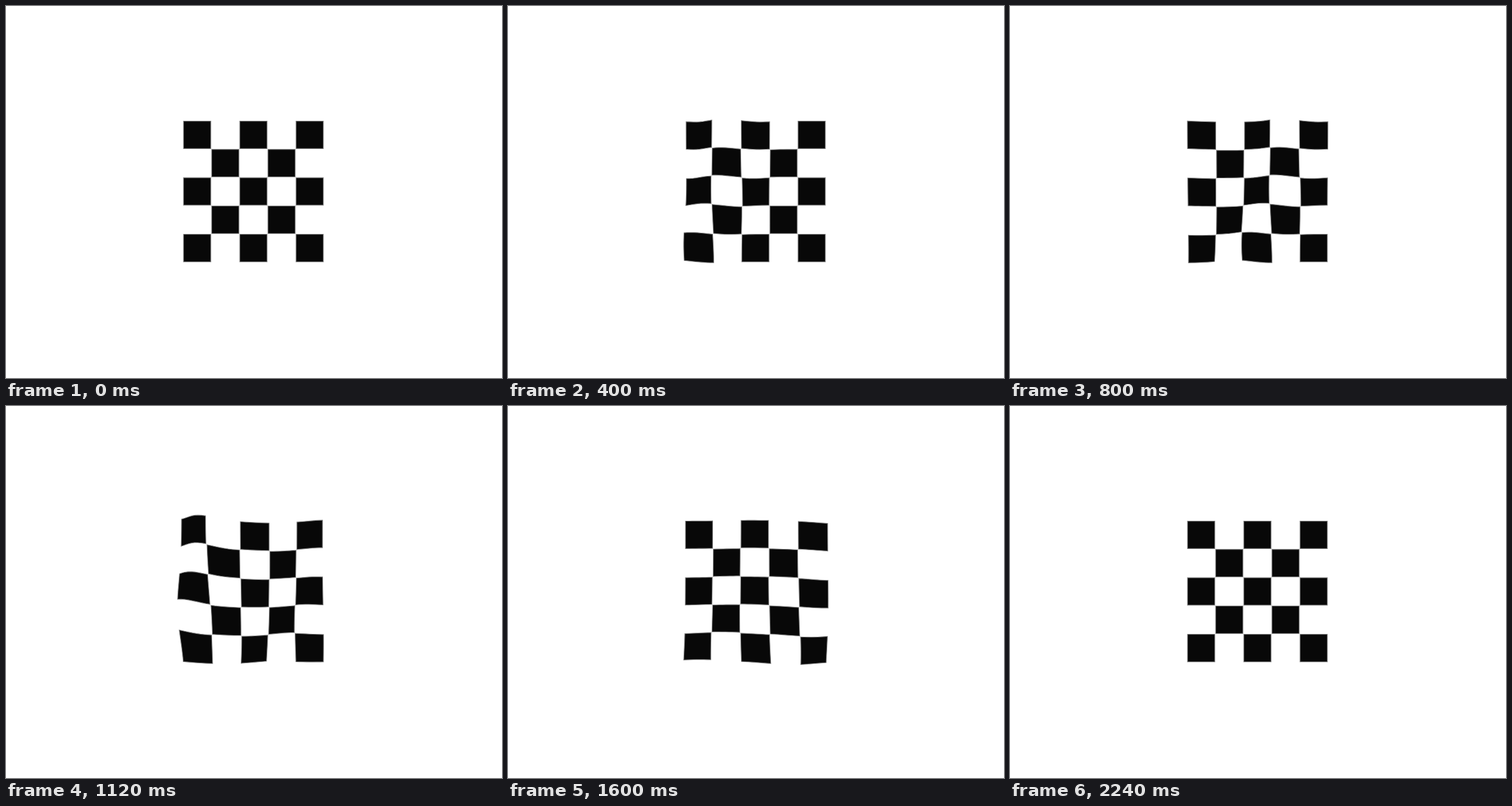
Write an HTML page with a canvas that moves like this. It is 864 by 648 pixels and loops after 2320 ms.

```html
<!DOCTYPE html>
<html lang="en">
<head>
<meta charset="utf-8">
<title>Waving checkerboard</title>
<style>
  html, body { margin: 0; width: 100%; height: 100%; overflow: hidden; background: #fff; }
  canvas { display: block; }
</style>
</head>
<body>
<canvas id="stage" width="864" height="648"></canvas>
<script>
const ctx = document.getElementById('stage').getContext('2d');
const LOOP = 2.32, STEP = 0.08, REST = 2.24;  // seconds
const LEFT = 308.5, TOP = 199.8, PITCH_X = 49, PITCH_Y = 49.3;
const SPEED = 5;     // cells per second
const TILT = 0.07;   // lower rows run ahead

// Swells that travel right together; each rises and fades around its peak time.
// at, width: cells; height: px; peak, span: seconds; grow: extra height at the bottom
const swells = [
  { at: 0.65, width: 0.5, height: 2, peak: 0.6, span: 0.4, grow: 0 },
  { at: -0.6, width: 0.6, height: -4.2, peak: 0.65, span: 0.5, grow: 0 },
  { at: -1.6, width: 0.4, height: 1.5, peak: 0.4, span: 0.2, grow: 0 },
  { at: -2.5, width: 1.1, height: 5, peak: 1.6, span: 0.8, grow: 0 },
  { at: -4.85, width: 0.68, height: -10.5, peak: 1.1, span: 0.25, grow: 0 },
  { at: -5.7, width: 1.2, height: -1.5, peak: 1.75, span: 0.4, grow: 2 }
];

const bell = x => Math.exp(-x * x);

function displacement(col, row, t) {
  const u = col + TILT * row * row - SPEED * t;
  const ramp = Math.max(0, Math.min(1, t / 0.2, (REST - t) / 0.3));
  return ramp * swells.reduce((sum, s) => sum +
    s.height * (1 + s.grow * (row / 5) ** 2) *
    bell((u - s.at) / s.width) * bell((t - s.peak) / s.span), 0);
}

function tile(col, row, t) {
  const inset = 0.015, size = 1 - 2 * inset, parts = 8;
  const corners = [[0, 0], [1, 0], [1, 1], [0, 1]];
  ctx.beginPath();
  corners.forEach(([x, y], i) => {
    const [nx, ny] = corners[(i + 1) % 4];
    for (let k = 0; k < parts; k++) {
      const f = k / parts;
      const c = col + inset + size * (x + (nx - x) * f);
      const r = row + inset + size * (y + (ny - y) * f);
      const d = displacement(c, r, t);
      ctx.lineTo(LEFT + c * PITCH_X + d, TOP + r * PITCH_Y + d);
    }
  });
  ctx.closePath();
  ctx.fill();
  ctx.stroke();
}

function draw(t) {
  ctx.fillStyle = '#fff';
  ctx.fillRect(0, 0, 864, 648);
  ctx.fillStyle = '#080808';
  ctx.strokeStyle = '#777';
  ctx.lineWidth = 1.2;
  for (let row = 0; row < 5; row++)
    for (let col = row % 2; col < 5; col += 2) tile(col, row, t);
}

const start = performance.now();
function tick() {
  const t = (performance.now() - start) / 1000 % LOOP;
  draw(Math.floor(t / STEP) * STEP);
  requestAnimationFrame(tick);
}
tick();
</script>
</body>
</html>
```
